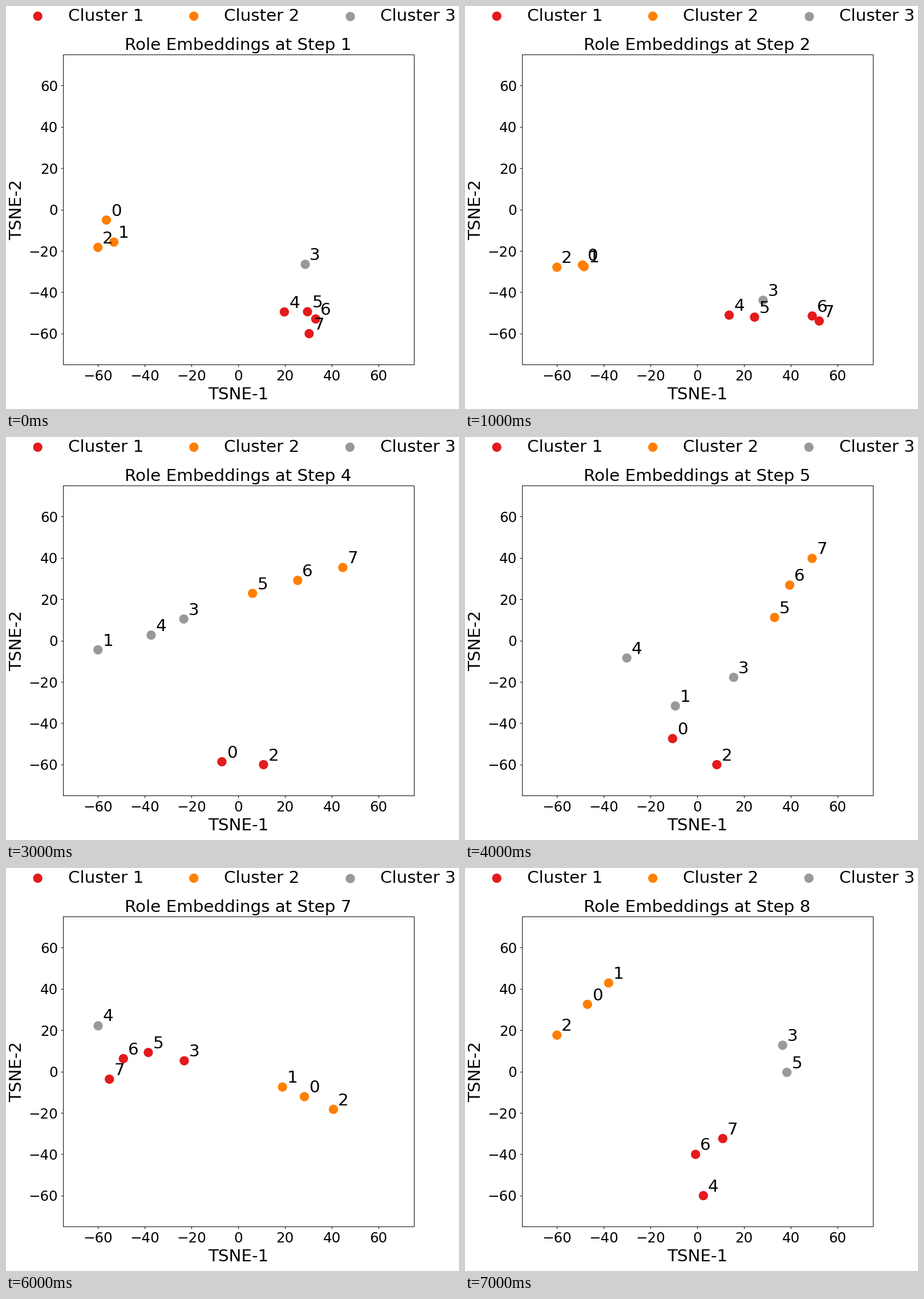
These frames come from a looping animation (794x706 px, 8 s). A matplotlib script:

```python
import matplotlib.pyplot as plt
import numpy as np
from matplotlib.animation import FuncAnimation

WIDTH, HEIGHT, DPI = 794, 706, 88.25
BIG, SMALL = 24, 20
LIMIT, REACH = 75, 60
RED, ORANGE, GREY = COLORS = ["#e41a1c", "#ff7f00", "#999999"]


def chain(color, agents, start, end=0, bend=0):
    """Space agents from start to end (x + yj); bend bows the row sideways."""
    t = np.linspace(0, 1, len(agents))
    spots = start + (end - start) * (t + 4 * t * (1 - t) * bend)
    return {int(a): (p, color) for a, p in zip(agents, spots)}


def layout(*chains):
    agents = {}
    for c in chains:
        agents.update(c)
    return agents


def between(first, second):
    """Halfway layout, rescaled to the common extent, with the first's colours."""
    mean = {a: (first[a][0] + second[a][0]) / 2 for a in first}
    extent = max(max(abs(p.real), abs(p.imag)) for p in mean.values())
    return {a: (p * REACH / extent, first[a][1]) for a, p in mean.items()}


two_sides = layout(
    chain(ORANGE, "210", -60 - 18.3j, -56.4 - 5.1j, -0.19 - 0.43j),
    chain(GREY, "3", 28.4 - 26.4j),
    chain(RED, "4567", 19.7 - 49.5j, 30.3 - 60j, 0.15 + 0.53j))
low_row = layout(
    chain(ORANGE, "210", -43.9 - 30j, -28.6 - 41.3j, 0.13 + 0.33j),
    chain(GREY, "453", 3.9 - 38.9j, 20.2 - 49.2j, -0.06 + 0.17j),
    chain(RED, "67", 52 - 36.2j, 60 - 33.3j))
rising = layout(
    chain(RED, "02", -7 - 58.6j, 10.8 - 60j),
    chain(GREY, "143", -60 - 4.5j, -23.3 + 10.4j, 0.1 - 0.05j),
    chain(ORANGE, "567", 6.1 + 22.8j, 44.7 + 35.3j))
arc = layout(
    chain(GREY, "40", -23 - 19.5j, -14.1 - 36.2j),
    chain(RED, "213", 5.9 - 60j, 54.4 - 46j, 0.18 - 0.17j),
    chain(ORANGE, "567", 60 - 0.5j, 53.5 + 44.1j, 0.07 + 0.06j))
falling = layout(
    chain(GREY, "4", -60 + 22.3j),
    chain(RED, "7653", -55.1 - 3.7j, -23.1 + 5.2j, -0.09 + 0.27j),
    chain(ORANGE, "102", 18.9 - 7.5j, 40.7 - 18.3j, -0.07))
spread = layout(
    chain(ORANGE, "201", -60 + 17.6j, -37.9 + 42.8j, 0.09),
    chain(GREY, "35", 36.5 + 12.7j, 38.3 - 0.4j),
    chain(RED, "467", 2.6 - 60j, 10.9 - 32.4j, 0.13 + 0.31j))

STEPS = [two_sides, between(two_sides, low_row), low_row, rising,
         between(rising, arc), arc, falling, spread]

plt.rcParams["font.family"] = "DejaVu Sans"
fig, ax = plt.subplots(
    figsize=((WIDTH + 0.001) / DPI, (HEIGHT + 0.001) / DPI), dpi=DPI)
fig.subplots_adjust(left=0.1255)


def draw(step):
    ax.clear()
    agents = STEPS[step]
    for k, color in enumerate(COLORS):
        group = np.array([p for p, c in agents.values() if c == color])
        ax.scatter(group.real, group.imag, s=150, c=[color] * len(group),
                   label=f"Cluster {k + 1}")
    for agent, (p, _) in agents.items():
        ax.text(p.real + 2, p.imag + 2, str(agent), fontsize=BIG)

    ticks = range(-REACH, REACH + 1, 20)
    ax.set(xlim=(-LIMIT, LIMIT), ylim=(-LIMIT, LIMIT),
           xticks=ticks, yticks=ticks)
    ax.tick_params(labelsize=SMALL)
    ax.set_xlabel("TSNE-1", fontsize=BIG, labelpad=5)
    ax.set_ylabel("TSNE-2", fontsize=BIG, labelpad=5)
    ax.set_title(f"Role Embeddings at Step {step + 1}", fontsize=BIG)
    ax.legend(loc="upper center", bbox_to_anchor=(0.5, 1.198), ncol=3,
              fontsize=BIG, frameon=False)
    return []


anim = FuncAnimation(fig, draw, frames=len(STEPS), interval=1000,
                     repeat=True, repeat_delay=0)
plt.show()
```
